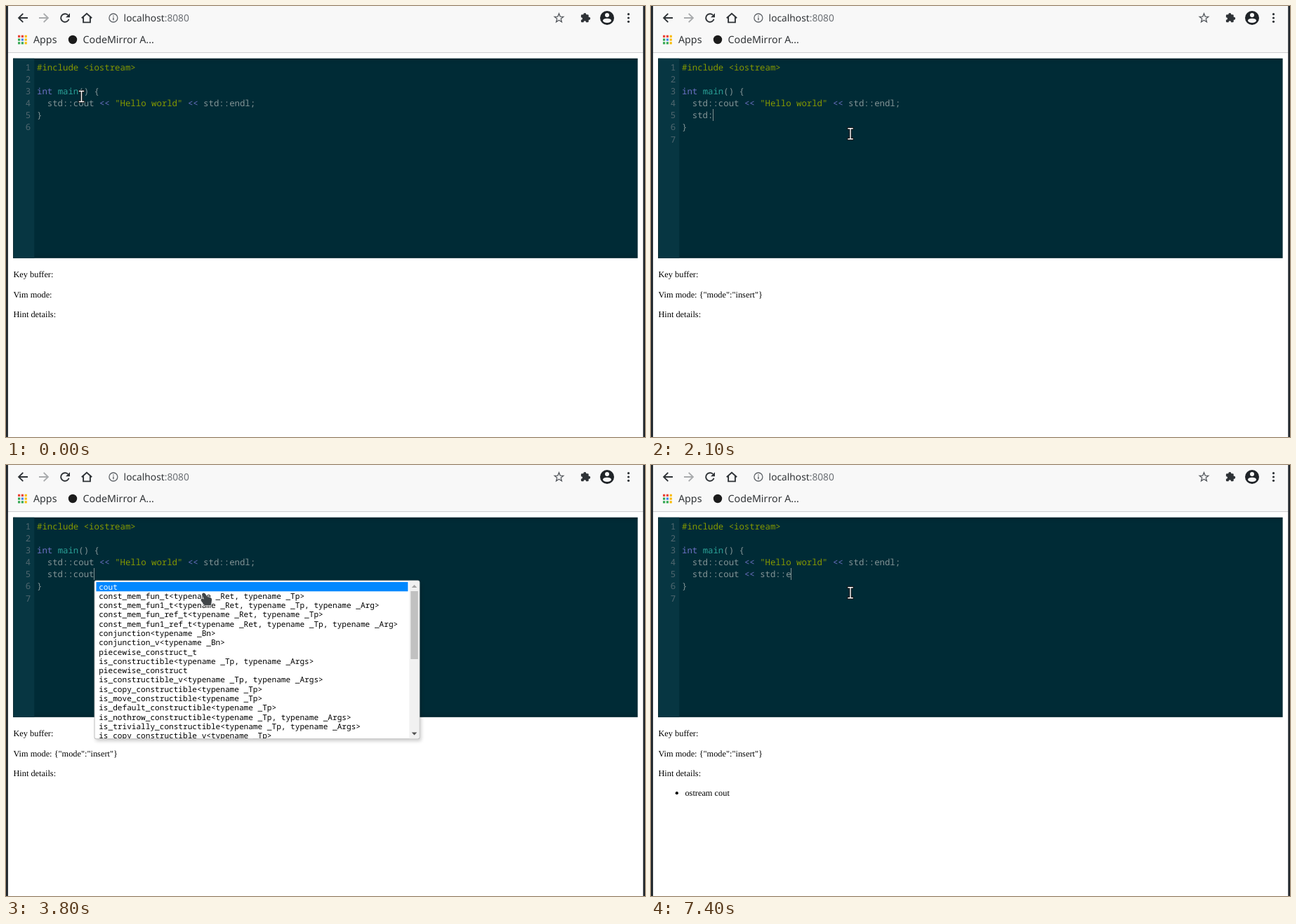
An HTML page with a canvas for the animation above (8000 ms loop, 910 by 615 pixels).

```html
<!DOCTYPE html>
<html lang="en">
<head>
<meta charset="utf-8">
<title>Editor completion</title>
<style>
  html, body { margin: 0; width: 100%; height: 100%; overflow: hidden; background: #fff; }
  canvas { display: block; }
</style>
</head>
<body>
<canvas id="stage" width="910" height="615"></canvas>
<script>
const ctx = document.getElementById('stage').getContext('2d');
ctx.textRendering = 'geometricPrecision';

const LOOP = 8000;
const MONO = '"Noto Sans Mono", monospace';
const SERIF = '"Liberation Serif", serif';
const SANS = '"Noto Sans", sans-serif';
const BASE = '#839496', VIOLET = '#6c71c4', GREEN = '#859900', TEAL = '#2aa198';
const BAR = '#f8f8f8', INK = '#2f3337';

const EDITOR = { x: 10.4, y: 74.8, w: 889.2, h: 285, gutter: 29.9 };
const CODE_X = 44, CHAR_W = 7.41, LINE_TOP = 78.7, LINE_H = 17.1;

const TYPED = 'std::cout << std::e';
const KEY_TIMES = [1600, 1800, 2000, 2100, 2200, 2400, 2500, 2800, 3800, 4800,
  6000, 6100, 6200, 6400, 6600, 6800, 7000, 7100, 7400];

// Pointer stops: time, x, y
const POINTER = [[0, 107.5, 129], [100, 107, 134], [200, 106, 138], [500, 122, 142],
  [600, 185, 158], [700, 258, 176], [800, 284, 182.3]];

const HINTS = [
  { from: 3300, to: 3800, x: 118.2, right: 734.8, thumb: 79, items: `cout
conjunction<Bn>
conjunction_v<Bn>
const_mem_fun_t<Ret,Tp>
const_mem_fun1_t<Ret,Tp,Arg>
const_mem_fun_ref_t<Ret,Tp>
const_mem_fun1_ref_t<Ret,Tp,Arg>
is_compound<Tp>
is_constructible<Tp,Args>
piecewise_construct
is_compound_v<Tp>
is_constructible_v<Tp,Args>
is_copy_constructible<Tp>
piecewise_construct_t
is_move_constructible<Tp>
is_default_constructible<Tp>
is_nothrow_constructible<Tp,Args>` },
  { from: 3800, to: 4300, x: 125.6, right: 589.4, thumb: 97, items: `cout
const_mem_fun_t<Ret,Tp>
const_mem_fun1_t<Ret,Tp,Arg>
const_mem_fun_ref_t<Ret,Tp>
const_mem_fun1_ref_t<Ret,Tp,Arg>
conjunction<Bn>
conjunction_v<Bn>
piecewise_construct_t
is_constructible<Tp,Args>
piecewise_construct
is_constructible_v<Tp,Args>
is_copy_constructible<Tp>
is_move_constructible<Tp>
is_default_constructible<Tp>
is_nothrow_constructible<Tp,Args>
is_trivially_constructible<Tp,Args>
is_copy_constructible_v<Tp>` }
];

const signature = s => s.replace(/[<,]/g, c => (c === ',' ? ', ' : c) + 'typename _');

function rect(x, y, w, h, color) {
  ctx.fillStyle = color;
  ctx.fillRect(x, y, w, h);
}

function disc(x, y, r, color) {
  ctx.fillStyle = color;
  ctx.beginPath();
  ctx.arc(x, y, r, 0, 7);
  ctx.fill();
}

function poly(points, color) {
  ctx.fillStyle = color;
  ctx.beginPath();
  points.forEach(([x, y]) => ctx.lineTo(x, y));
  ctx.fill();
}

function stroke(path, color, width) {
  ctx.strokeStyle = color;
  ctx.lineWidth = width;
  ctx.stroke(new Path2D(path));
}

function text(s, x, y, size, family, color, align = 'left') {
  ctx.font = `${size}px ${family}`;
  ctx.textAlign = align;
  ctx.fillStyle = color;
  ctx.fillText(s, x, y);
}

function drawIcons() {
  stroke('M31 17H18.5M24.3 10.8L18.1 17L24.3 23.2', INK, 1.9);
  stroke('M47 17H59.5M53.7 10.8L59.9 17L53.7 23.2', '#a9abad', 1.9);

  ctx.strokeStyle = INK;
  ctx.lineWidth = 1.9;
  ctx.beginPath();
  ctx.arc(84, 17, 5.8, 0.3, 5.5);
  ctx.stroke();
  poly([[91, 10.3], [91, 16.2], [85, 16.2]], INK);

  stroke('M107.8 17.3L115 10.8L122.2 17.3M110.1 15.8V23.4H119.9V15.8', INK, 1.9);

  ctx.strokeStyle = '#5f6368';
  ctx.lineWidth = 1.3;
  ctx.beginPath();
  ctx.arc(152.9, 17, 6, 0, 7);
  ctx.stroke();
  rect(152.2, 16.2, 1.4, 4.1, '#5f6368');
  rect(152.2, 13.6, 1.4, 1.4, '#5f6368');

  ctx.strokeStyle = '#55595e';
  ctx.lineWidth = 1.3;
  ctx.beginPath();
  for (let i = 0; i < 10; i++) {
    const a = i * Math.PI / 5 - Math.PI / 2, r = i % 2 ? 2.9 : 6.7;
    ctx.lineTo(787.5 + r * Math.cos(a), 17.4 + r * Math.sin(a));
  }
  ctx.closePath();
  ctx.stroke();

  ctx.fillStyle = INK;
  ctx.beginPath();
  ctx.roundRect(818.9, 12.3, 10.8, 11, 1.3);
  ctx.fill();
  disc(824.3, 12.2, 2.1, INK);
  disc(830.1, 17.8, 2.1, INK);
  disc(819.2, 18, 1.8, BAR);
  disc(824.3, 23, 1.8, BAR);

  disc(856, 17, 10, '#202428');
  disc(856, 13.1, 3, BAR);
  ctx.beginPath();
  ctx.ellipse(856, 20.8, 6, 3.1, 0, 0, 7);
  ctx.fill();

  [11.7, 17, 22.3].forEach(y => disc(886.5, y, 1.6, INK));
}

function drawBrowser() {
  rect(0, 0, 910, 615, '#fff');
  rect(0, 0, 910, 66, BAR);
  rect(0, 66, 910, 1, '#cfcfd1');
  drawIcons();

  const host = 'localhost';
  text(host, 167.6, 21.6, 13.75, SANS, '#303336');
  text(':8080', 167.6 + ctx.measureText(host).width, 21.6, 13.75, SANS, '#6b6f74');

  const red = '#ea4335', yellow = '#fbbc05', green = '#34a853', blue = '#4285f4';
  [red, red, yellow, green, blue, yellow, green, green, yellow].forEach((c, i) =>
    rect(17 + i % 3 * 4.8, 41.7 + Math.floor(i / 3) * 4.8, 3.2, 3.2, c));
  text('Apps', 39, 53, 14.25, SANS, '#303336');
  disc(95, 48, 6.2, '#1b1b1b');
  text('CodeMirror A...', 109.5, 53, 14.25, SANS, '#303336');

  rect(0, 0, 2.9, 615, '#20262c');
  rect(907.3, 0, 2.7, 615, '#20262c');
}

function drawEditorBox() {
  const { x, y, w, h, gutter } = EDITOR;
  ctx.save();
  rect(x, y, w, h, '#002b36');
  ctx.beginPath();
  ctx.rect(x, y, w, h);
  ctx.clip();
  ctx.shadowColor = '#000';
  ctx.shadowBlur = 11.4;
  ctx.fillStyle = '#000';
  ctx.beginPath();
  ctx.rect(x - 60, y - 60, w + 120, h + 120);
  ctx.rect(x + 1, y - 5.7, w + 11.4, h + 11.4);
  ctx.fill('evenodd');
  ctx.restore();
  rect(x, y, gutter, h, '#073642');
}

const baseline = row => LINE_TOP + 13.2 + row * LINE_H;

// Each part is [text, colour]
function drawLine(row, parts) {
  let col = 0;
  for (const [s, color] of parts) {
    text(s, CODE_X + col * CHAR_W, baseline(row), 12.35, MONO, color);
    col += s.length;
  }
}

function colorize(code) {
  return code.split(/("[^"]*"|<+)/).filter(Boolean).map(s =>
    [s, s[0] === '"' ? GREEN : s[0] === '<' ? VIOLET : BASE]);
}

function drawCode(t) {
  const inserting = t >= 1500;
  const count = KEY_TIMES.filter(k => k <= t).length;

  if (t >= 500 && t < 1000) rect(103.2, LINE_TOP + 3 * LINE_H, 9, LINE_H, '#586e75');

  drawLine(0, [['#include <iostream>', GREEN]]);
  drawLine(2, [['int', VIOLET], [' ', BASE], ['main', TEAL], ['() {', BASE]]);
  drawLine(3, colorize('  std::cout << "Hello world" << std::endl;'));
  if (inserting) drawLine(4, colorize('  ' + TYPED.slice(0, count)));
  drawLine(inserting ? 5 : 4, [['}', BASE]]);

  const lines = inserting ? 7 : 6;
  for (let i = 0; i < lines; i++) {
    text(i + 1, 35.2, baseline(i), 12.35, MONO, '#50676f', 'right');
  }

  const blinkedOff = t >= 5400 && t < 5800;
  if (inserting && !blinkedOff) {
    rect(Math.round(CODE_X + (2 + count) * 7.4), 147, 1, 17, '#819090');
  }
}

function drawDetails(t) {
  const mode = t >= 1500 ? ' {"mode":"insert"}' : '';
  ['Key buffer:', 'Vim mode:' + mode, 'Hint details:'].forEach((s, i) =>
    text(s, 10.4, 387.4 + i * 28.4, 12.35, SERIF, '#000'));
  if (t >= 4300) {
    disc(36.8, 468.2, 2.1, '#000');
    text('ostream cout', 48.4, 471.9, 12.35, SERIF, '#000');
  }
}

function drawHints({ x, right, thumb, items }) {
  const top = 164.5, bottom = 391.2, rowH = 13.28, barX = right - 15.1;
  ctx.save();
  ctx.shadowColor = 'rgba(0,0,0,.2)';
  ctx.shadowBlur = 4.8;
  ctx.shadowOffsetX = 1.9;
  ctx.shadowOffsetY = 2.9;
  ctx.fillStyle = '#c0c0c0';
  ctx.beginPath();
  ctx.roundRect(x, top, right - x, bottom - top, 2.9);
  ctx.fill();
  ctx.restore();

  ctx.save();
  ctx.beginPath();
  ctx.roundRect(x + 1, top + 1, right - x - 2, bottom - top - 2, 2);
  ctx.clip();
  rect(x, top, right - x, bottom - top, '#fff');
  rect(x + 2.9, 167, barX - x - 4.8, rowH, '#08f');
  items.split('\n').forEach((s, i) =>
    text(signature(s), x + 6.6, 177.6 + i * rowH, 11.1, MONO, i ? '#000' : '#fff'));

  rect(barX, top, 15, bottom - top, '#f1f1f1');
  rect(barX + 2, 180, 10.5, thumb, '#c1c1c1');
  const mid = barX + 7.2;
  poly([[mid - 3.8, 175], [mid, 171], [mid + 3.8, 175]], '#a3a3a3');
  poly([[mid - 3.8, 381.5], [mid, 385.5], [mid + 3.8, 381.5]], '#505050');
  ctx.restore();
}

function drawBeam(x, y) {
  ctx.save();
  ctx.translate(x, y);
  const beam = 'M-3 -7.5H3M0 -7.5V7.5M-3 7.5H3';
  ctx.lineCap = 'square';
  stroke(beam, '#111', 3.4);
  stroke(beam, '#fff', 1.4);
  ctx.restore();
}

function drawHand() {
  const hand = new Path2D('M280 183Q282.5 181.5 284 184L286.5 188L291 189Q293.5 190 293 193' +
    'L292 200H282.5L278 194Q276.5 191 279.5 190.5L282 191.5L279.2 185.5Q278.8 184 280 183Z');
  ctx.lineJoin = 'round';
  ctx.strokeStyle = 'rgba(255,255,255,.7)';
  ctx.lineWidth = 1.2;
  ctx.stroke(hand);
  ctx.fillStyle = '#404548';
  ctx.fill(hand);
  ctx.lineJoin = 'miter';
}

function draw(now) {
  const t = now % LOOP;
  drawBrowser();
  drawEditorBox();
  drawCode(t);
  drawDetails(t);

  const hints = HINTS.find(h => t >= h.from && t < h.to);
  if (hints) {
    drawHints(hints);
    drawHand();
  } else {
    const [, x, y] = POINTER.filter(p => p[0] <= t).pop();
    drawBeam(x, y);
  }
}

const start = performance.now();
function tick() {
  draw(performance.now() - start);
  requestAnimationFrame(tick);
}
tick();
</script>
</body>
</html>
```
